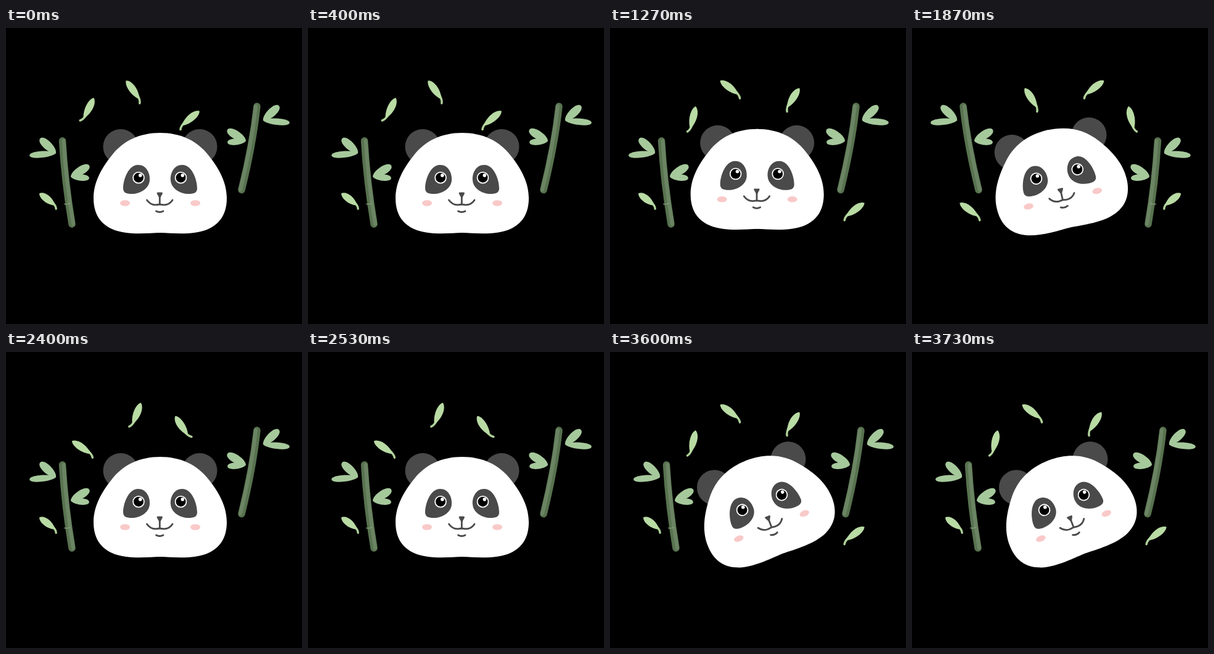
An HTML page for the animation above (4190 ms loop, 480 by 480 pixels).

```html
<!DOCTYPE html>
<html lang="en">
<head>
<meta charset="utf-8">
<title>Panda</title>
<style>
  html, body { margin: 0; width: 100%; height: 100%; overflow: hidden; background: #000; }
  svg { display: block; width: 100vw; height: 100vh; }
</style>
</head>
<body>
<svg viewBox="0 0 480 480">
  <!-- The panda is drawn around the point between its cheeks. -->
  <defs>
    <g id="ear"><circle cx="-64" cy="-91.500" r="28.500" fill="#4a4a4a"/></g>
    <g id="half">
      <path fill="#fff" d="M1 -114C-34 -114 -60 -101 -78 -78C-96 -56 -108 -33 -108 -8C-108 16 -98 33 -78 42C-56 52 -24 49 1 48Z"/>
      <path fill="#4a4a4a" d="M-60 -24C-60 -39 -51 -62 -36 -62C-22 -62 -16 -48 -17 -37C-18 -23 -33 -15 -46 -15C-55 -15 -60 -17 -60 -24Z"/>
      <ellipse cx="-57" rx="8" ry="4.800" fill="#f9c9c9"/>
    </g>
  </defs>
  <g id="panda">
    <use href="#ear"/><use href="#ear" transform="scale(-1 1)"/>
    <use href="#half"/><use href="#half" transform="scale(-1 1)"/>
    <g id="eyes"></g>
    <g stroke="#4a4a4a" stroke-width="2.800" stroke-linecap="round" stroke-linejoin="round" fill="none">
      <path fill="#4a4a4a" d="M-4 -16H2.500L-0.700 -10Z"/>
      <path d="M-0.700 -10V2M-21.500 -5Q-16 3 -7 2.800L-0.700 2L5.500 2.800Q15 3 20 -5"/>
      <path d="M-6.500 13Q-0.700 16 5 13"/>
    </g>
  </g>
  <g id="scene">
    <g id="bamboo"></g>
    <g id="loose"></g>
  </g>
</svg>
<script>
const $ = id => document.getElementById(id);
const STEP = 600, LOOP = 4190, MIDDLE = 245;

const turned = (x, y, angle, body) =>
  `<g transform="translate(${x} ${y}) rotate(${angle})">${body}</g>`;

const leaf = (angle, len, w) => turned(0, 0, angle,
  `<path fill="#a6c99c" d="M0 0C${len * .15} ${-w * .65} ${len} ${-w * .75} ${len} 0S${len * .15} ${w * .65} 0 0Z"/>`);

// A pair of leaves: one raised, one nearly flat.
const sprout = (x, y, side, up, len) =>
  `<g transform="translate(${x} ${y}) scale(${side} 1)">${leaf(-up, 35, 13)}${leaf(5, len, 10)}</g>`;

// Leaves bow inwards, so the bend depends on the side they float on.
function looseLeaf([x, y, angle], len = 44) {
  const bow = x < MIDDLE ? 1 : -1;
  return turned(x, y, angle, `<g transform="translate(${-len / 2} 0) scale(1 ${bow})">
    <path d="M1 0Q${len * .12} 4 ${len * .4} 4" fill="none" stroke="#aed098" stroke-width="3.500" stroke-linecap="round"/>
    <path fill="#b9dba4" d="M${len * .15} 3C${len * .4} -5 ${len * .85} -7 ${len} 0C${len * .9} 8 ${len * .5} 11 ${len * .15} 3Z"/></g>`);
}

const stem = (d, light) =>
  `<g fill="none" stroke-linecap="round"><path d="${d}" stroke="#58724f" stroke-width="11.500"/>
   <path d="${d}" transform="translate(${light} 0)" stroke="#6b8463" stroke-width="6"/></g>`;

const eye = x => turned(x, -41.3, 0,
  '<circle r="9.800" fill="#fff"/><circle r="8" fill="#000"/><circle cx="2.800" cy="-3.800" r="2.800" fill="#fff"/>');

$("eyes").innerHTML = eye(-35) + eye(33.5);

$("bamboo").innerHTML =
  stem("M91.500 183Q95.500 250 107 318", 2) + stem("M407 127Q400 190 382 262.500", -2) +
  '<path d="M94 285Q98 287 104 284" fill="none" stroke="#8aa27c" stroke-width="1.200"/>' +
  sprout(81, 203, -1, 43, 43) + sprout(417, 150, 1, 43, 43) +
  sprout(105, 241, 1, 31, 30) + sprout(389, 183, -1, 31, 30) +
  looseLeaf([68, 281, -137], 38);

// Centre and direction of each floating leaf.
const drifts = {
  start: [[206, 104, -121], [131, 132, -59], [298, 150, -44]],
  sway: [[195, 100, -138], [297, 117, -62], [132, 148, -72], [396, 298, -41]],
  turn: [[209, 102, -64], [288, 121, -128], [124, 158, -141]]
};

const upright = { x: 250, y: 284, tilt: 0 };
const poses = [
  { ...upright, drift: "start" },
  { x: 248.8, y: 274.8, tilt: 19, drift: "sway" },
  { x: 238.7, y: 277.8, tilt: 0, drift: "sway", shift: -8 },
  { x: 244.7, y: 276.8, tilt: -12.7, drift: "sway", flip: true },
  { ...upright, drift: "turn" },
  { x: 232.8, y: 274.6, tilt: 19, drift: "sway", flip: true },
  { x: 262, y: 282.2, tilt: -21, drift: "sway" }
];

let shown;

function render(time) {
  const pose = poses[Math.floor(time % LOOP / STEP)];
  if (pose === shown) return;
  shown = pose;
  const { x, y, tilt, drift, shift = 0, flip } = pose;
  $("panda").setAttribute("transform", `translate(${x} ${y}) rotate(${tilt})`);
  $("scene").setAttribute("transform", flip ? `translate(${2 * MIDDLE} 0) scale(-1 1)` : "");
  $("bamboo").setAttribute("transform", `translate(${shift} 0)`);
  $("loose").innerHTML = drifts[drift].map(spot => looseLeaf(spot)).join("");
}

const start = performance.now();
function tick() {
  render(performance.now() - start);
  requestAnimationFrame(tick);
}
tick();
</script>
</body>
</html>
```
